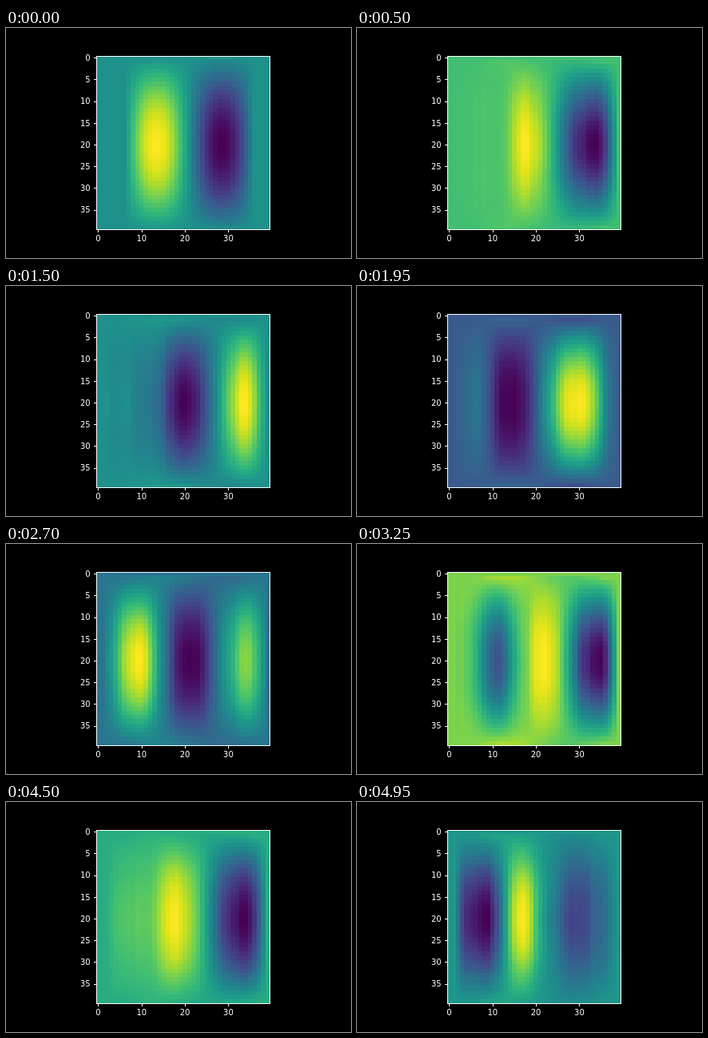
These frames come from a looping animation (432x288 px, 5 s). An HTML page with a canvas:

```html
<!DOCTYPE html>
<html>
<head>
<meta charset="utf-8">
<style>
  html, body { margin: 0; background: #000; overflow: hidden; }
  canvas { display: block; }
</style>
</head>
<body>
<canvas id="stage" width="432" height="288"></canvas>
<script>
const ctx = document.getElementById('stage').getContext('2d');
const N = 40, FRAMES = 100, FRAME_MS = 50;
const LEFT = 112.68, TOP = 34.56, SIZE = 217.44, CELL = SIZE / N;
const STEPS = 10, COURANT = 0.3;   // three cells of travel per frame

// Polynomial fit of the viridis colour map, lowest power first
const VIRIDIS = [
  [0.27773, 0.10509, -0.33086, -4.63423, 6.22827, 4.77638, -5.43546],
  [0.00541, 1.40461, 0.21485, -5.79910, 14.17993, -13.74515, 4.64585],
  [0.33410, 1.38459, 0.09510, -19.33244, 56.69055, -65.35303, 26.31244]
];
const viridis = v => 'rgb(' + VIRIDIS.map(poly =>
  Math.round(255 * Math.min(1, Math.max(0, poly.reduceRight((sum, c) => sum * v + c, 0))))) + ')';
const PALETTE = Array.from({ length: 256 }, (_, i) => viridis(i / 255));

// One sine period travelling right, half a sine from top to bottom
function pulse(shift) {
  const field = new Float64Array(N * N);
  for (let y = 0; y < N; y++)
    for (let x = 0; x < N; x++) {
      const s = x + shift - 6;
      if (s > 0 && s < 30)
        field[y * N + x] = Math.sin(2 * Math.PI * s / 30) * Math.sin(Math.PI * y / N);
    }
  return field;
}

// Wave equation; the outer cells keep their first value
function step(prev, now) {
  const next = now.slice();
  for (let y = 2; y < N - 1; y++)
    for (let x = 2; x < N - 1; x++) {
      const i = y * N + x;
      const laplacian = now[i - 1] + now[i + 1] + now[i - N] + now[i + N] - 4 * now[i];
      next[i] = 2 * now[i] - prev[i] + COURANT ** 2 * laplacian;
    }
  return next;
}

function simulate() {
  const frames = [];
  let prev = pulse(COURANT), now = pulse(0);
  for (let f = 0; f < FRAMES; f++) {
    frames.push(now);
    for (let s = 0; s < STEPS; s++) [prev, now] = [now, step(prev, now)];
  }
  return frames;
}

function drawField(field) {
  const low = Math.min(...field), high = Math.max(...field);
  const edge = (start, i) => Math.round(start + i * CELL);
  for (let y = 0; y < N; y++)
    for (let x = 0; x < N; x++) {
      const left = edge(LEFT, x), top = edge(TOP, y);
      ctx.fillStyle = PALETTE[Math.round((field[y * N + x] - low) / (high - low) * 255)];
      ctx.fillRect(left, top, edge(LEFT, x + 1) - left, edge(TOP, y + 1) - top);
    }
}

function drawAxes() {
  ctx.strokeStyle = ctx.fillStyle = '#fff';
  ctx.lineWidth = 1;
  ctx.strokeRect(113.5, 35.5, 217, 217);
  ctx.font = '10px "DejaVu Sans", sans-serif';
  ctx.textAlign = 'center';
  for (let v = 0; v < N; v += 10) {
    const x = LEFT + (v + 0.5) * CELL;
    ctx.fillRect(Math.round(x), 253, 1, 3);
    ctx.fillText(v, x, 267);
  }
  ctx.textAlign = 'right';
  for (let v = 0; v < N; v += 5) {
    const y = TOP + (v + 0.5) * CELL;
    ctx.fillRect(110, Math.round(y), 3, 1);
    ctx.fillText(v, 105.7, Math.round(y + 3.7));
  }
}

const frames = simulate();

function render() {
  ctx.fillStyle = '#000';
  ctx.fillRect(0, 0, 432, 288);
  drawField(frames[Math.floor(performance.now() / FRAME_MS) % FRAMES]);
  drawAxes();
  requestAnimationFrame(render);
}
render();
</script>
</body>
</html>
```
